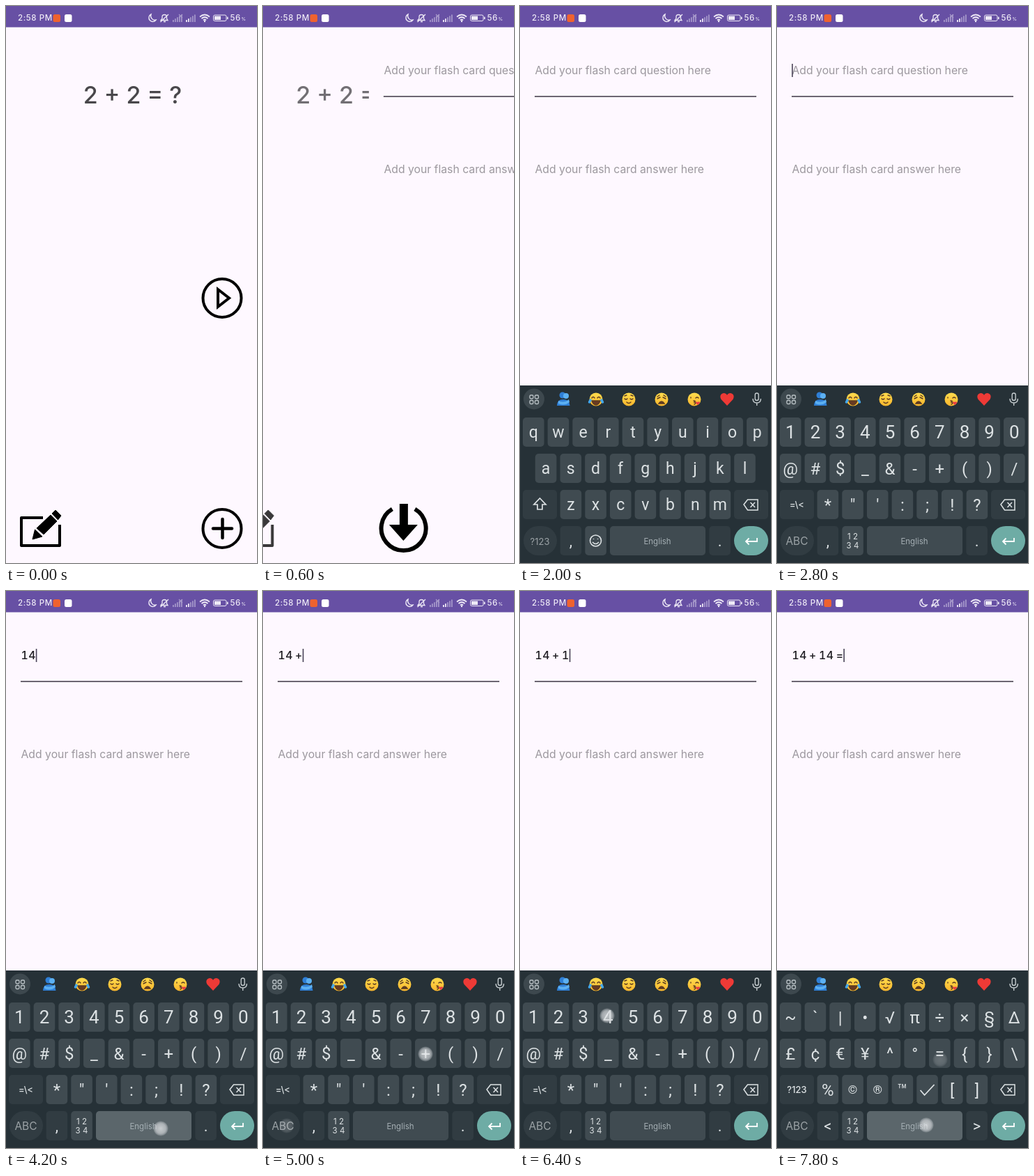
These frames come from a looping animation (360x800 px, 8 s). An HTML page:

```html
<!DOCTYPE html>
<html lang="en">
<head>
<meta charset="utf-8">
<title>Flash cards</title>
<style>
html, body { margin: 0; width: 100%; height: 100%; overflow: hidden; background: #fef8ff; }
svg { display: block; width: 360px; height: 800px; font-family: Inter, Roboto, sans-serif; }
text { white-space: pre; }
.hint { font-size: 15.75px; fill: #9c989e; }
.icon { fill: none; stroke: #000; stroke-width: 4; }
.key { text-anchor: middle; fill: #dde2e4; }
.glyph { font-family: Roboto, Inter, sans-serif; }
#typed { font-size: 15.8px; font-weight: 500; letter-spacing: .4px; word-spacing: -1.3px; font-variant-numeric: tabular-nums; }
</style>
</head>
<body>
<svg id="stage" viewBox="0 0 360 800">
  <defs>
    <radialGradient id="dot">
      <stop offset="0" stop-color="#e9ebed" stop-opacity=".85"/>
      <stop offset=".65" stop-color="#d4d7da" stop-opacity=".75"/>
      <stop offset=".85" stop-color="#d0d4d8" stop-opacity=".45"/>
      <stop offset="1" stop-color="#d0d4d8" stop-opacity="0"/>
    </radialGradient>
    <linearGradient id="skin" x2="0" y2="1">
      <stop offset="0" stop-color="#ffdc4e"/><stop offset="1" stop-color="#f9b52c"/>
    </linearGradient>
  </defs>
  <rect width="360" height="800" fill="#fef8ff"/>

  <g id="home">
    <text x="181.5" y="140" font-size="34" font-weight="500" text-anchor="middle" fill="#49474b">2 + 2 = ?</text>
    <g class="icon">
      <circle cx="310" cy="419.5" r="27.5"/>
      <path d="M304 407V432L320 419.5Z"/>
      <circle cx="310" cy="750.5" r="27.5"/>
      <path d="M297 750.5H324M310.500 737V764" stroke-width="4.5" stroke-linecap="round"/>
      <path d="M53 735H22V775H77V745" stroke-linejoin="round"/>
    </g>
    <path d="M38 766L41.500 752L52 762ZM44 750L64 731L73 740L54 759ZM66 729L71 724L79 732L74.500 738Z" stroke="#000" stroke-linejoin="round"/>
  </g>

  <g id="form">
    <rect width="360" height="800" fill="#fef8ff"/>
    <text class="hint" id="hint" x="21.500" y="98">Add your flash card question here</text>
    <text id="typed" x="21.500" y="97.500" fill="#1d1b20"></text>
    <rect id="caret" y="83" width="1.600" height="19" fill="#4a4458"/>
    <rect x="21" y="129" width="318" height="1.800" fill="#5d5763"/>
    <text class="hint" x="21.500" y="239.500">Add your flash card answer here</text>
    <g class="icon">
      <circle cx="310" cy="750.5" r="27.5"/>
      <path d="M300.500 741L320 760.500M320 741L300.500 760.500"/>
      <path d="M33.500 722.500A32 32 0 1 0 66 722.500" stroke-width="6"/>
    </g>
    <path d="M44 715H56V745H70L49.500 768L29 745H44Z"/>
  </g>

  <g id="board"></g>

  <g id="status" fill="#eeeaf6">
    <rect width="360" height="30.500" fill="#6750a4"/>
    <text x="17" y="21.300" font-size="11.5" font-weight="500" letter-spacing=".6">2:58 PM</text>
    <rect x="67.500" y="12" width="10.500" height="11" rx="2.500" fill="#ef622f"/>
    <rect x="84" y="12" width="10.500" height="11" rx="2.500" fill="#fff"/>
    <path d="M208 12A5.500 5.500 0 1 0 215 20A6 6 0 0 1 208 12Z" fill="none" stroke="#eeeaf6" stroke-width="1.400"/>
    <path d="M222 20.500H232L230.500 18V15.500C230.500 11.500 224 11.500 224 15.500V18ZM226 22.500H229M221.500 23L233 12" fill="none" stroke="#eeeaf6" stroke-width="1.300"/>
    <g id="bars"></g>
    <path d="M248 12L253 17M253 12L248 17" stroke="#a99bcb" stroke-width="1.200"/>
    <path d="M278 15.500Q285 9.500 292 15.500M280.500 18Q285 14 289.500 18M283 20.500Q285 18.500 287 20.500" fill="none" stroke="#eeeaf6" stroke-width="1.700"/>
    <circle cx="285" cy="22" r="1.200"/>
    <rect x="297.500" y="13" width="18.500" height="8.500" rx="2" fill="none" stroke="#eeeaf6"/>
    <rect x="299" y="14.500" width="9" height="5.500"/>
    <rect x="317" y="15.500" width="1.600" height="3.500" rx=".6"/>
    <text x="321.500" y="21.300" font-size="11.5" font-weight="500" letter-spacing=".6">56</text>
    <text x="337.500" y="21.300" font-size="6.500" font-weight="500">%</text>
  </g>

  <g id="touches"></g>
</svg>
<script>
const $ = id => document.getElementById(id);
const LOOP = 8000, STEP = 200;

/* ---------- keyboard ---------- */
const PITCH = 35.67, ROWS = [591, 643, 695, 747];
const KEY = '#404b51', DIM = '#313c42';

const box = (x, y, w, fill = KEY, r = 5, extra = '') =>
  `<rect x="${x}" y="${y}" width="${w}" height="42" rx="${r}" fill="${fill}" ${extra}/>`;
const esc = s => s.replace(/&/g, '&amp;').replace(/</g, '&lt;').replace(/>/g, '&gt;');
const label = (s, x, y, size, extra = '') =>
  `<text class="key" x="${x}" y="${y}" font-size="${size}" ${extra}>${esc(s)}</text>`;
const glyph = (s, x, y, size) =>
  `<text class="key glyph" x="${x}" y="${y}" font-size="${size}">${esc(s)}</text>`;

function key(s, x, y, size, fill) {
  const cx = x + 15.3, cy = y + 21;
  if ('©®'.includes(s)) size *= .72;
  const face = s === '✓'
    ? `<path d="M${cx - 10} ${cy + 1}l6 7l14 -15" fill="none" stroke="#dde2e4" stroke-width="1.800"/>`
    : glyph(s, cx, cy + size * .36, size);
  return box(x, y, 30.6, fill) + face;
}
const keyRow = (chars, x, y, size) =>
  [...chars].map((c, i) => key(c, x + i * PITCH, y, size)).join('');

function layout({ rows, size, inset = 0, side, mode, ends, letters }) {
  const shift = '<path d="M28.500 707L37 716H32V723H25V716H20Z" fill="none" stroke="#dde2e4" stroke-width="1.700"/>';
  const smile = '<g fill="none" stroke="#dde2e4" stroke-width="1.600"><circle cx="108.500" cy="768" r="8"/><path d="M104 770q4.500 5 9 0M105.500 765v1M111.500 765v1"/></g>';
  const digits = ['1 2', '3 4'].map((s, i) => label(s, 108.5, 766 + i * 13, 11.5)).join('');
  return keyRow(rows[0], 4, ROWS[0], size[0])
    + keyRow(rows[1], 4 + inset, ROWS[1], size[1])
    + box(4, ROWS[2], 49, DIM)
    + (side ? label(side, 28.5, 720.5, 13, 'font-weight="500"') : shift)
    + keyRow(rows[2], 57.6, ROWS[2], size[2])
    + box(5, ROWS[3], 48, DIM, 21)
    + label(mode, 28.5, 773.5, mode === 'ABC' ? 15.5 : 13, 'fill-opacity=".62"')
    + key(ends[0], 57.6, ROWS[3], 22, DIM) + key(ends[1], 271.3, ROWS[3], 22, DIM)
    + box(93.3, ROWS[3], 30.6) + (letters ? smile : digits);
}

const LAYOUTS = {
  abc: { rows: ['qwertyuiop', 'asdfghjkl', 'zxcvbnm'], size: [23, 23, 23], inset: 17.8, mode: '?123', ends: ',.', letters: true },
  sym: { rows: ['1234567890', '@#$_&-+()/', '*"\':;!?'], size: [26, 24, 24], side: '=\\<', mode: 'ABC', ends: ',.' },
  alt: { rows: ['~`|•√π÷×§Δ', '£¢€¥^°={}\\', '%©®™✓[]'], size: [24, 24, 24], side: '?123', mode: 'ABC', ends: '<>' }
};

const face = (x, inner) =>
  `<g transform="translate(${x} 565)"><circle r="9.500" fill="url(#skin)"/><g fill="none" stroke="#5a3b22" stroke-width="1.400" stroke-linecap="round">${inner}</g></g>`;

const emoji =
  '<g fill="#2f7fd6"><circle cx="61" cy="559" r="4.500"/><path d="M53 574Q53 565 62 565Q71 565 71.500 574Z"/></g>' +
  '<g fill="#5cb0f2"><circle cx="66" cy="560" r="4"/><path d="M55 567Q64 571 70 565L71 569Q64 575 55 571Z"/></g>' +
  face(109, '<path d="M-6 -2q2 -3 4 0M2 -2q2 -3 4 0"/><path d="M-6 2H6Q4 8 0 8T-6 2Z" fill="#693a22"/><path d="M-8 1l-1.500 3M8 1l1.500 3" stroke="#43a8ed" stroke-width="3.500"/>') +
  face(156, '<path d="M-6 -1q2 2 4 0M2 -1q2 2 4 0M-3 4q3 3 6 0M-6 -5l3 -1M6 -5l-3 -1"/>') +
  face(203, '<path d="M-6 -1l4 -2M6 -1l-4 -2M-6 -4l3 -2M6 -4l-3 -2"/><path d="M-4 6Q0 0 4 6Z" fill="#693a22"/>') +
  face(250, '<path d="M-5 -3v1M2 -2q2 -2 4 0M-1 2q4 0 1 2q4 1 0 3"/><path d="M5 8l-3 -3q0 -3 3 -1q3 -2 3 1Z" fill="#e83c45" stroke="none"/>') +
  '<path d="M297 574L288.500 565C284 557 294 553 297 559C300 553 310 557 305.500 565Z" fill="#ee3a36"/>';

const tiles = [[14, 559], [21.5, 559], [14, 566.5], [21.5, 566.5]]
  .map(([x, y]) => `<rect x="${x}" y="${y}" width="5" height="5" rx="1.500"/>`).join('');

$('board').innerHTML =
  '<rect y="545" width="360" height="256" fill="#263137"/>' +
  '<circle cx="20" cy="564.500" r="15" fill="#3d484e"/>' +
  `<g fill="none" stroke="#bcc4c8" stroke-width="1.300">${tiles}</g>` + emoji +
  '<rect x="337.200" y="556" width="5" height="10.500" rx="2.500" fill="none" stroke="#c4cbce" stroke-width="1.400"/>' +
  '<path d="M334 564q0 6 5.700 6t5.700 -6M339.700 570v4" fill="none" stroke="#c4cbce" stroke-width="1.400"/>' +
  Object.entries(LAYOUTS).map(([id, l]) => `<g id="${id}">${layout(l)}</g>`).join('') +
  box(129, ROWS[3], 137, KEY, 5, 'id="space"') +
  label('English', 197, 772.5, 11.5, 'style="fill:#a5afb4"') +
  box(307, ROWS[2], 49, DIM) +
  '<path d="M321 716L326.500 709H341V724H326.500ZM330.500 713L337 720M337 713L330.500 720" fill="none" stroke="#dde2e4" stroke-width="1.500"/>' +
  box(307, ROWS[3], 49, '#6eaca5', 21) +
  '<path d="M340 764V769H324M328.500 764.500L324 769L328.500 773.500" fill="none" stroke="#fff" stroke-width="1.800"/>';

$('bars').innerHTML = [239, 258].map((x, j) => [0, 1, 2, 3, 4].map(i =>
  `<rect x="${x + i * 3}" y="${20 - i * 1.9}" width="1.800" height="${3 + i * 1.9}" opacity="${j && i < 2 ? 1 : .45}"/>`).join('')).join('');

/* ---------- timeline ---------- */
const typing = [[0, ''], [1600, ''], [3200, '1'], [4000, '14'], [4400, '14 '], [5000, '14 +'], [5200, '14 + '],
  [6200, '14 + 1'], [6600, '14 + 14'], [7000, '14 + 14 '], [7600, '14 + 14 =']];
const modes = [[0, 'abc'], [2600, 'sym'], [4400, 'abc'], [5000, 'sym'], [5400, 'abc'], [5600, 'sym'],
  [7000, 'abc'], [7200, 'sym'], [7400, 'alt']];
const taps = [[200, 310, 750], [1400, 244, 122], [2400, 33, 768], [3000, 20, 612], [3800, 125, 611],
  [4200, 222, 772], [4800, 34, 768], [5000, 233, 665], [5200, 216, 769], [5600, 36, 767], [6000, 20, 611],
  [6400, 125, 610], [6800, 217, 768], [7000, 35, 767], [7200, 29, 717], [7600, 234, 673], [7800, 214, 767]];

const latest = (list, t) => list.filter(e => e[0] <= t).pop();
const ease = p => 1 - (1 - p) ** 3;
const ramp = (t, a, b) => ease(Math.min(1, Math.max(0, (t - a) / (b - a))));

function draw(t) {
  const slide = ramp(t, 450, 1050);
  $('home').setAttribute('transform', `translate(${-110 * slide})`);
  $('form').setAttribute('transform', `translate(${360 * (1 - slide)})`);
  $('home').style.opacity = 1 - .4 * slide;

  const [since, str] = latest(typing, t);
  $('typed').textContent = str;
  $('hint').style.display = str ? 'none' : '';
  const width = str ? $('typed').getComputedTextLength() + .3 : 0;
  $('caret').setAttribute('x', 21.2 + width);
  $('caret').style.display = t >= 1600 && (t - since) % 1000 < 400 ? '' : 'none';

  const rise = ramp(t, 1700, 2000);
  $('board').style.display = rise ? '' : 'none';
  $('board').setAttribute('transform', `translate(0 ${256 * (1 - rise)})`);
  const mode = latest(modes, t)[1];
  for (const id in LAYOUTS) $(id).style.display = id === mode ? '' : 'none';

  const active = taps.filter(([at]) => t >= at && t < at + 2 * STEP);
  const onSpace = active.some(([at, x, y]) => t < at + STEP && y > 747 && x > 129 && x < 266);
  $('space').setAttribute('fill', onSpace ? '#5b666b' : KEY);
  $('touches').innerHTML = active.map(([at, x, y]) =>
    `<circle cx="${x}" cy="${y}" r="11" fill="url(#dot)" opacity="${t < at + STEP ? .9 : .28}"/>`).join('');
}

const start = performance.now();
let shown = -1;
function tick() {
  const t = Math.floor(((performance.now() - start) % LOOP) / STEP) * STEP;
  if (t !== shown) draw(shown = t);
  requestAnimationFrame(tick);
}
draw(0);
tick();
</script>
</body>
</html>
```
